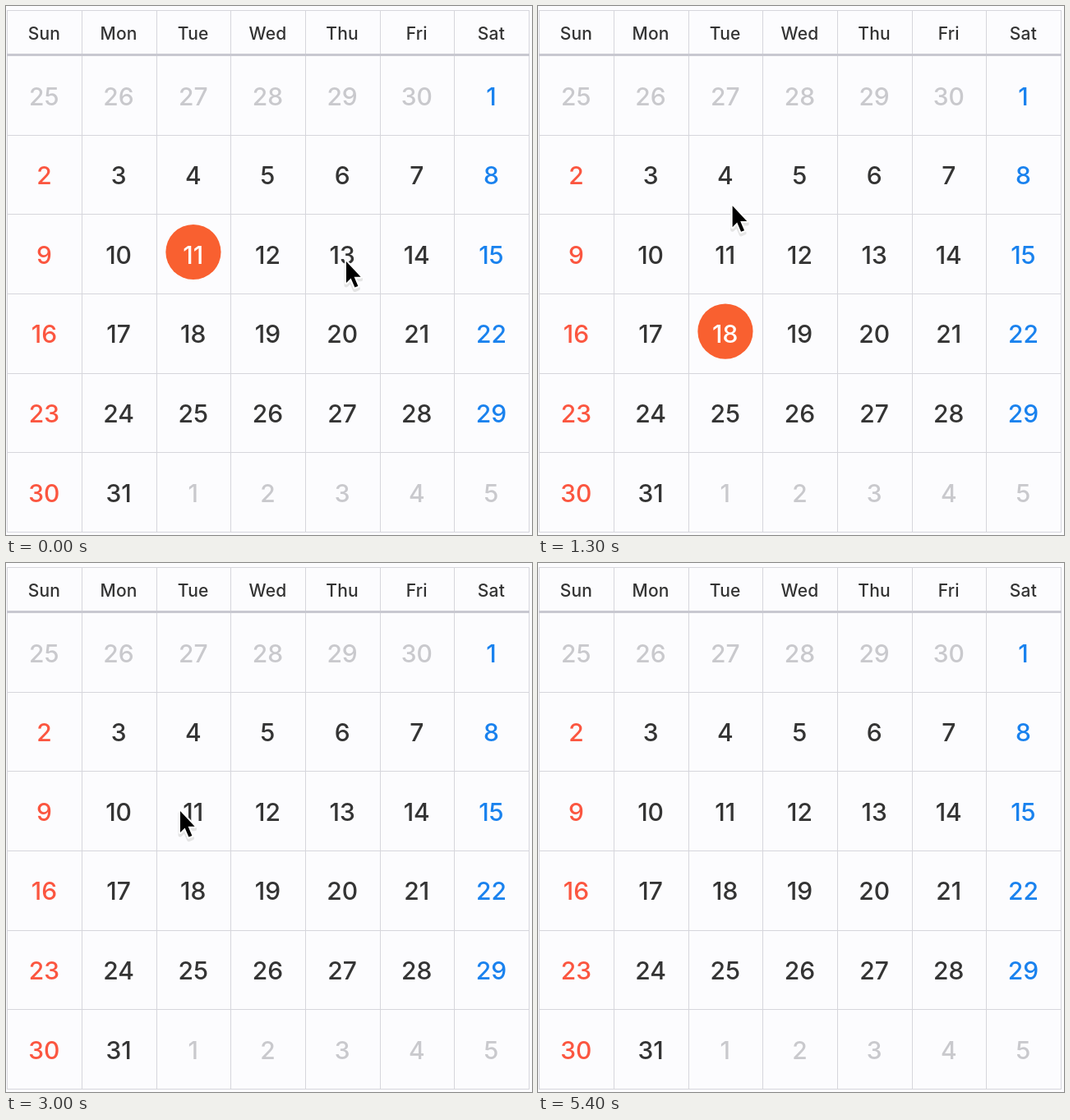
Recreate the animation shown at these times as an HTML page. Size 640 by 644 pixels, loop 5.5 s.

```html
<!DOCTYPE html>
<html lang="en">
<head>
<meta charset="utf-8">
<title>Calendar</title>
<style>
  html, body { margin: 0; width: 100%; height: 100%; overflow: hidden; background: #fcfcfe; }
  svg { display: block; width: 640px; height: 644px; }
  text { font-family: Inter, Roboto, sans-serif; font-weight: 500; text-anchor: middle; cursor: default; user-select: none; }
  .head { font-size: 21px; fill: #333333; letter-spacing: .2px; }
  .day { font-size: 30px; }
</style>
</head>
<body>
<svg id="stage" viewBox="0 0 640 644" xmlns="http://www.w3.org/2000/svg"></svg>
<script>
const LOOP = 5500, STEP = 100;
const COL = 90.67, ROW = 96.6;
const LINE = '#d6d6dc';
const colors = { sun: '#fb5640', sat: '#1a82ee', day: '#343434', muted: '#c9c9cd', picked: '#ffffff' };
const stage = document.getElementById('stage');

function add(tag, attrs, parent = stage) {
  const el = document.createElementNS('http://www.w3.org/2000/svg', tag);
  for (const key in attrs) el.setAttribute(key, attrs[key]);
  parent.appendChild(el);
  return el;
}

const bar = (x, y, width, height, fill = LINE) => add('rect', { x, y, width, height, fill });

function label(text, x, y, cls, fill) {
  const el = add('text', { x, y, class: cls });
  if (fill) el.setAttribute('fill', fill);
  el.textContent = text;
  return el;
}

const colX = c => 46.4 + c * COL;
const rowY = r => 109.8 + r * ROW;

// Grid
for (let c = 0; c <= 7; c++) bar(Math.round(1.16 + c * COL), 5, 1, 636);
for (let r = 1; r <= 6; r++) bar(1, Math.round(60.25 + r * ROW), 636, 1);
bar(1, 5, 636, 1);
bar(1, 58, 636, 3, '#c8c8d0');

const dot = add('circle', { r: 33.6, fill: '#f96030' });

// Dates
['Sun', 'Mon', 'Tue', 'Wed', 'Thu', 'Fri', 'Sat'].forEach((name, c) => label(name, colX(c), 40.5, 'head'));

const days = {};
for (let i = 0; i < 42; i++) {
  const col = i % 7, row = Math.floor(i / 7), n = i - 5;
  const outside = n < 1 || n > 31;
  const shown = n < 1 ? n + 30 : n > 31 ? n - 31 : n;
  const fill = outside ? colors.muted : col === 0 ? colors.sun : col === 6 ? colors.sat : colors.day;
  const el = label(shown, colX(col), rowY(row) + 10.7, 'day', fill);
  if (!outside) days[n] = { el, fill, x: colX(col), y: rowY(row) };
}

// Pointer
const arrow = 'M1 2V28L6.6 22.4 11.4 33.6 15.4 32 10.6 20.8H18.6Z';
const pointer = add('g', {});
add('path', { d: arrow, transform: 'translate(0 3)', fill: '#dcdcdc', stroke: '#dcdcdc', 'stroke-width': 5, 'stroke-linejoin': 'round', opacity: .75 }, pointer);
add('path', { d: arrow, fill: '#000', stroke: '#fff', 'stroke-width': 4, 'stroke-linejoin': 'round', 'paint-order': 'stroke' }, pointer);

// [time, x, y]
const route = [
  [0, 413, 309], [600, 239, 399], [1000, 239, 399], [1400, 235, 212], [1600, 235, 212],
  [1800, 309, 311], [2200, 309, 311], [2500, 262, 311], [3000, 211, 300], [3200, 211, 300],
  [3600, 482, 402], [4900, 482, 402]
];
// [time, selected date]
const picks = [[0, 11], [600, 18], [1400, 4], [2200, 0], [3600, 21], [4300, 0]];
const HIDE = 4900;

const ease = p => p * p * (3 - 2 * p);

function pointerAt(t) {
  const i = route.findIndex(k => k[0] > t);
  if (i < 0) return route[route.length - 1].slice(1);
  const [t0, x0, y0] = route[i - 1], [t1, x1, y1] = route[i];
  const p = ease((t - t0) / (t1 - t0));
  return [x0 + (x1 - x0) * p, y0 + (y1 - y0) * p];
}

function draw(now) {
  const t = Math.floor((now % LOOP) / STEP) * STEP;
  const picked = picks.filter(k => k[0] <= t).pop()[1];
  for (const n in days) days[n].el.setAttribute('fill', +n === picked ? colors.picked : days[n].fill);
  dot.setAttribute('visibility', picked ? 'visible' : 'hidden');
  if (picked) {
    dot.setAttribute('cx', days[picked].x + .2);
    dot.setAttribute('cy', days[picked].y - 3.5);
  }
  const [x, y] = pointerAt(t);
  pointer.setAttribute('transform', `translate(${x} ${y})`);
  pointer.setAttribute('visibility', t < HIDE ? 'visible' : 'hidden');
}

const start = performance.now();
function tick() {
  draw(performance.now() - start);
  requestAnimationFrame(tick);
}
tick();
</script>
</body>
</html>
```
